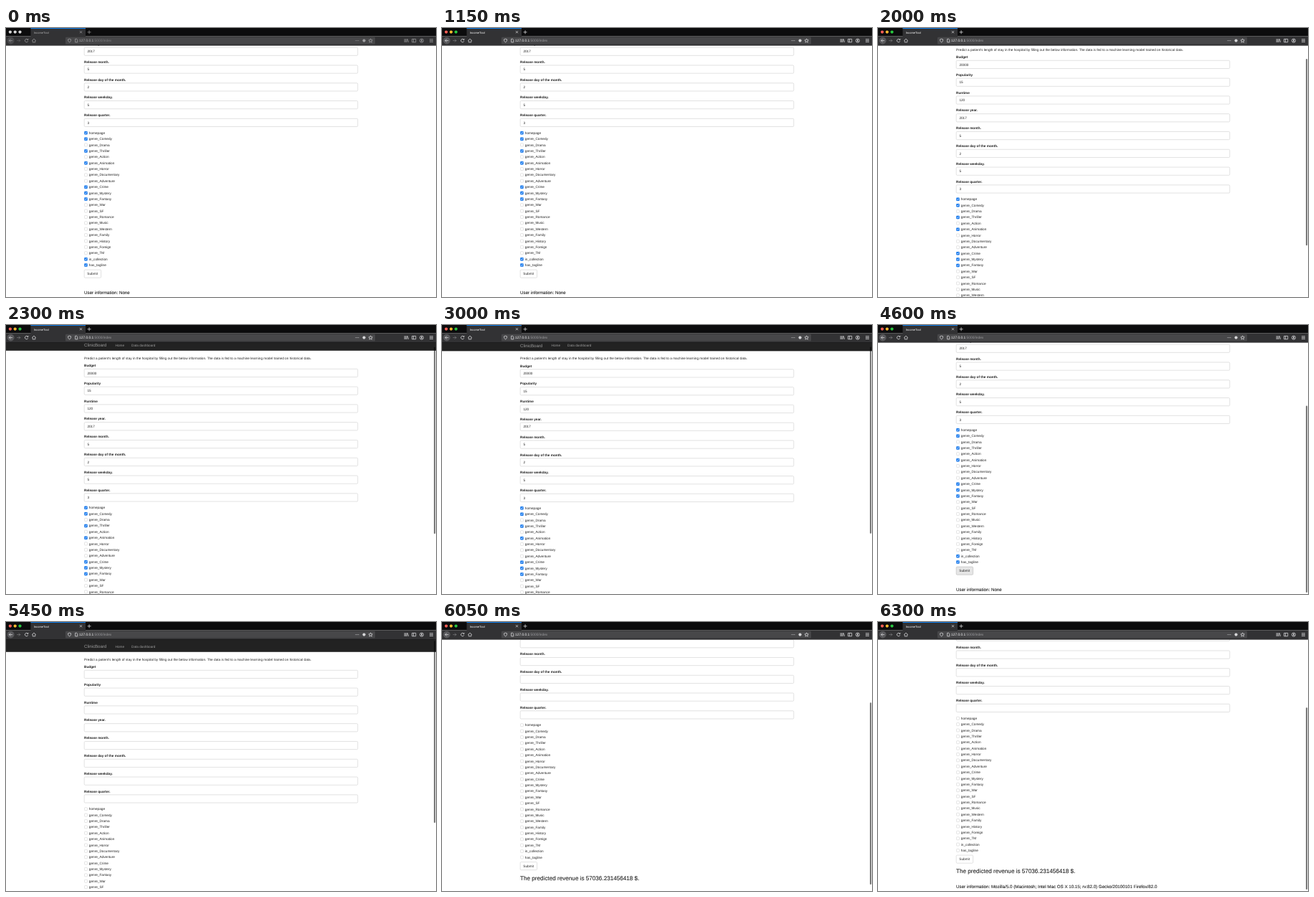
An HTML page that plays this animation: 600x375 px, repeating every 8 s.

```html
<!DOCTYPE html>
<html lang="en">
<head>
<meta charset="utf-8">
<title>Form</title>
<style>
  html, body { margin: 0; width: 100%; height: 100%; overflow: hidden; background: #fff; }
  svg { display: block; width: 600px; height: 375px; }
  text { font-family: "Liberation Sans", Arial, sans-serif; font-size: 4.72px; fill: #333;
         text-rendering: geometricPrecision; white-space: pre; }
  #page text { fill: #222; }
  #page .label { font-weight: bold; fill: #1c1c1c; }
  #page .nav { fill: #9d9d9d; }
  #page .head { font-size: 6.2px; stroke: #222; stroke-width: .1; }
  .icon { fill: none; stroke: #d6d6d8; stroke-width: .8; }
</style>
</head>
<body>
<svg id="stage" viewBox="0 0 600 375">
  <defs><clipPath id="view"><rect y="24" width="600" height="351"/></clipPath></defs>
  <rect width="600" height="375" fill="#fff"/>
  <g clip-path="url(#view)">
    <g id="page"></g>
    <rect id="thumb" x="597" width="2.2" rx="1.1" fill="#000" fill-opacity=".52"/>
  </g>
  <g id="chrome">
    <rect width="600" height="11.5" fill="#0c0c0d"/>
    <rect y="11.5" width="600" height="12.8" fill="#323234"/>
    <rect x="34.5" width="76.5" height="12" fill="#323234"/>
    <rect x="34.5" width="76.5" height=".9" fill="#0a84ff"/>
    <rect x="83" y="12.8" width="432" height="9.8" rx="1" fill="#474749"/>
    <rect y="24" width="600" height=".4" fill="#0c0c0d"/>
    <g id="lights"></g>
    <g id="icons">
      <text x="38.7" y="7.5" style="font-size:4.1px;fill:#f9f9fa">IncomeTool</text>
      <path class="icon" d="M103 4.2l3 3m0-3l-3 3M113.6 5.8h5m-2.5-2.5v5"/>
      <circle cx="6.6" cy="17.6" r="4.6" fill="#57575a" stroke="#6c6c70" stroke-width=".4"/>
      <path class="icon" d="M9 17.6H4.4m2-2l-2 2 2 2"/>
      <path class="icon" opacity=".4" d="M15.2 17.6h4.6m-2-2l2 2-2 2"/>
      <path class="icon" d="M30.4 16.3a2.2 2.2 0 1 0 .3 2M30.9 14.9v1.7h-1.7"/>
      <path class="icon" d="M36.3 17.6l2.7-2.5 2.7 2.5M37.2 17.3v2.6h3.6v-2.6"/>
      <path class="icon" d="M88.6 15.2l2 .7c0 2-.4 3.2-2 4.1-1.6-.9-2-2.1-2-4.1z"/>
      <path class="icon" d="M96.7 15.3h2l1.1 1.1v3.5h-3.1z"/>
      <text x="102" y="19.2" style="font-size:4.85px;fill:#f9f9fa">127.0.0.1<tspan fill="#98989b">:5000/index</tspan></text>
      <path class="icon" stroke-dasharray="1 .9" d="M487.6 17.6h5" stroke-width="1"/>
      <circle cx="499.6" cy="17.6" r="2.1" fill="#d6d6d8"/>
      <path class="icon" d="M508.7 14.9l.8 1.8 1.9.2-1.4 1.3.4 1.9-1.7-1-1.7 1 .4-1.9-1.4-1.3 1.9-.2z" stroke-width=".6"/>
      <path class="icon" d="M556.2 15.2v4.8m1.6-4.8v4.8m1.5-4.8v4.8m1-4.7l1.3 4.6"/>
      <path class="icon" d="M566.6 15.4h5.2v4.4h-5.2zm2 0v4.4"/>
      <circle class="icon" cx="580" cy="17.6" r="2.6"/>
      <circle cx="580" cy="16.9" r="1" fill="#d6d6d8"/>
      <path class="icon" d="M578.4 19.2q1.6-1.6 3.2 0M591 15.8h5m-5 1.8h5m-5 1.8h5"/>
    </g>
  </g>
</svg>
<script>
const NS = "http://www.w3.org/2000/svg";
const byId = id => document.getElementById(id);
const page = byId("page"), thumb = byId("thumb"), icons = byId("icons");

function add(parent, tag, attrs, content = "") {
  const el = document.createElementNS(NS, tag);
  for (const key in attrs) el.setAttribute(key, attrs[key]);
  el.textContent = content;
  parent.appendChild(el);
  return el;
}
const write = (x, y, content, cls = "", parent = page) =>
  add(parent, "text", { x, y, class: cls }, content);

const LEFT = 109.1, VIEW_TOP = 24.3, VIEW = 350.7, LOOP = 8000;
const SUBMITTED = 5350;

// Navigation bar and introduction
add(page, "rect", { y: 24, width: 600, height: 17.6, fill: "#222" });
add(page, "rect", { y: 41.4, width: 600, height: .35, fill: "#080808" });
write(LEFT, 36, "ClinicBoard", "nav").style.fontSize = "6.1px";
write(152.6, 35.6, "Home", "nav");
write(175, 35.6, "Data dashboard", "nav");
write(LEFT, 53.9, "Predict a patient's length of stay in the hospital by filling out the below information. " +
  "The data is fed to a machine learning model trained on historical data.");

const filled = add(page, "g", {});

// Text fields
const fields = [["Budget", "20000"], ["Popularity", "15"], ["Runtime", "120"], ["Release year.", "2017"],
  ["Release month.", "5"], ["Release day of the month.", "2"], ["Release weekday.", "5"], ["Release quarter.", "3"]];
fields.forEach(([label, value], i) => {
  const y = 24.79 * i;
  write(LEFT, y + 64.1, label, "label");
  add(page, "rect", { x: LEFT + .1, y: y + 67.3, width: 381.6, height: 11.2, rx: 1.3,
    fill: "#fff", stroke: "#c4c4c4", "stroke-width": .5 });
  write(113.4, y + 74.6, value, "", filled);
});

// Check boxes
const genres = "Comedy Drama Thriller Action Animation Horror Documentary Adventure Crime Mystery Fantasy " +
  "War SF Romance Music Western Family History Foreign TM";
const options = ["homepage", ...genres.split(" ").map(g => "genre_" + g), "in_collection", "has_tagline"];
const chosen = /homepage|Comedy|Thriller|Animation|Crime|Mystery|Fantasy|in_|has_/;
options.forEach((name, i) => {
  const y = 260.7 + 8.375 * i;
  add(page, "rect", { x: 109.5, y: y - 2, width: 4, height: 4, rx: .8,
    fill: "#fff", stroke: "#bdbdbd", "stroke-width": .4 });
  if (chosen.test(name)) {
    add(filled, "rect", { x: 109.2, y: y - 2.2, width: 4.5, height: 4.5, rx: .9, fill: "#1a7cf0" });
    add(filled, "path", { d: `M110.3 ${y}l.9 1 1.5-2`, fill: "none", stroke: "#fff", "stroke-width": .7 });
  }
  write(115.8, y + 1.6, name);
});
page.appendChild(filled);

// Button and results
const button = add(page, "rect", { x: LEFT + .1, y: 451.6, width: 23.4, height: 11.1, rx: 1.3, "stroke-width": .5 });
write(113.3, 458.9, "Submit");
const result = write(LEFT, 476.8, "The predicted revenue is 57036.231456418 $.", "head");
result.style.fontSize = "8.15px";
const info = write(LEFT, 0, "", "head");

const lights = ["#ff5f57", "#febc2e", "#28c840"].map((color, i) =>
  ({ color, el: add(byId("lights"), "circle", { cx: 5.9 + 6.8 * i, cy: 5.6, r: 2.1 }) }));

// [time, scroll offset]
const scrollKeys = [[0, 114.5], [1700, 114.5], [1750, 107], [1850, 64], [1950, 30], [2000, 22], [2100, 22],
  [2150, 19], [2300, 6], [2400, 0], [2950, 0], [3000, 5.5], [3050, 5.5], [3100, 12], [3500, 78],
  [3700, 110], [3750, 114.5], [5300, 114.5], [SUBMITTED, 0], [5500, 0], [5550, 5], [5650, 24],
  [5850, 80], [5950, 104], [6050, 117], [6150, 117], [6200, 122], [6250, 122], [6300, 126.5], [LOOP, 126.5]];

function scrollAt(t) {
  const i = scrollKeys.findIndex(key => key[0] > t);
  const [t0, s0] = scrollKeys[i - 1], [t1, s1] = scrollKeys[i];
  return s0 + (s1 - s0) * (t - t0) / (t1 - t0);
}

function buttonColors(t) {
  if (t >= 4600 && t < 5200) return ["#e6e6e6", "#adadad"];
  if (t >= 5200 && t < SUBMITTED) return ["#d4d4d4", "#8c8c8c"];
  return ["#fff", "#c4c4c4"];
}

function render(time) {
  const t = Math.floor(time % LOOP / 50) * 50;
  const active = t >= 1150, done = t >= SUBMITTED;
  const scroll = scrollAt(t);

  for (const { el, color } of lights) el.setAttribute("fill", active ? color : "#d8d8d8");
  icons.setAttribute("opacity", active ? 1 : .62);
  page.setAttribute("transform", `translate(0 ${-scroll})`);

  const ratio = VIEW / (VIEW + (done ? 126.5 : 114.5));
  thumb.setAttribute("y", VIEW_TOP + scroll * ratio + 2);
  thumb.setAttribute("height", VIEW * ratio - 4);
  thumb.setAttribute("visibility", t >= 1750 && t < 2850 || t >= 3000 ? "visible" : "hidden");

  const [fill, stroke] = buttonColors(t);
  button.setAttribute("fill", fill);
  button.setAttribute("stroke", stroke);

  filled.setAttribute("visibility", done ? "hidden" : "visible");
  result.setAttribute("visibility", done ? "visible" : "hidden");
  info.setAttribute("y", done ? 497.2 : 485.2);
  info.textContent = "User information: " + (done
    ? "Mozilla/5.0 (Macintosh; Intel Mac OS X 10.15; rv:82.0) Gecko/20100101 Firefox/82.0" : "None");
}

const start = performance.now();
function tick() {
  render(performance.now() - start);
  requestAnimationFrame(tick);
}
tick();
</script>
</body>
</html>
```
